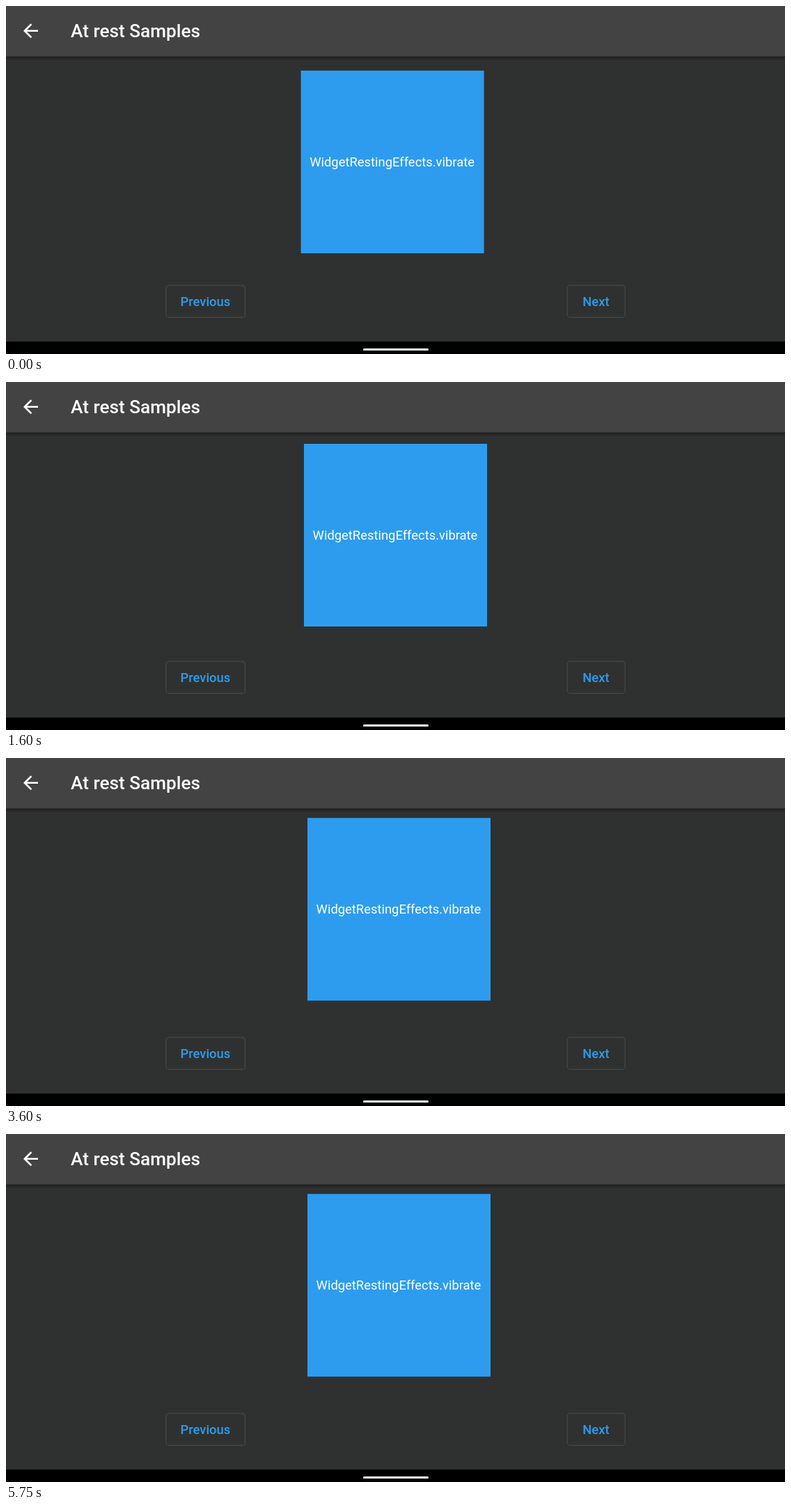
An HTML page for the animation above (5800 ms loop, 1119 by 501 pixels).

```html
<!DOCTYPE html>
<html lang="en">
<head>
<meta charset="utf-8">
<title>At rest Samples</title>
<style>
  html, body { margin: 0; width: 100%; height: 100%; overflow: hidden; background: #2f3130; }
  svg { display: block; width: 100%; height: 100%; }
  text { font: 500 18.4px Roboto, sans-serif; fill: #2d9cee; text-anchor: middle; }
  .title { font-size: 26.2px; fill: #fff; text-anchor: start; }
  .label { font-weight: 400; fill: #fff; }
  .button { fill: none; stroke: #464848; stroke-width: 1.2; }
</style>
</head>
<body>
<svg viewBox="0 0 1119 501">
  <defs>
    <linearGradient id="shade" x2="0" y2="1">
      <stop offset="0" stop-color="#000" stop-opacity=".4"/>
      <stop offset="1" stop-color="#000" stop-opacity="0"/>
    </linearGradient>
  </defs>
  <rect width="1119" height="501" fill="#2f3130"/>

  <g id="box">
    <rect width="263" height="263" fill="#2d9cee"/>
    <text class="label" x="131" y="138">WidgetRestingEffects.vibrate</text>
  </g>

  <rect y="72" width="1119" height="7" fill="url(#shade)"/>
  <rect width="1119" height="72.5" fill="#434343"/>
  <path transform="translate(19.7 20) scale(1.315)" fill="#fff"
    d="M20 11H7.83l5.59-5.59L12 4l-8 8 8 8 1.41-1.41L7.83 13H20z"/>
  <text class="title" x="93" y="45">At rest Samples</text>

  <rect class="button" x="229.8" y="402.2" width="113.5" height="46.2" rx="4.5"/>
  <text x="286.4" y="432">Previous</text>
  <rect class="button" x="806.2" y="402.2" width="83" height="46.2" rx="4.5"/>
  <text x="847.4" y="432">Next</text>

  <rect y="483" width="1119" height="18" fill="#000"/>
  <rect x="513" y="493" width="94" height="3" rx="1.5" fill="#fff"/>
</svg>
<script>
  const LOOP = 5800;
  const lowLeft = [423.6, 93], lowRight = [432, 93];
  const topLeft = [423.6, 84.2], topRight = [433, 86.3];
  const middle = [428, 89];

  // Each stop: arrival time, departure time, position.
  const stops = [
    [0, 350, lowLeft], [560, 620, lowRight], [760, 1230, topRight],
    [1570, 1600, middle], [1780, 1970, lowLeft], [2170, 2300, topLeft],
    [2720, 2980, lowRight], [3110, 3640, topRight],
    [3900, 3930, middle], [4180, 4370, lowLeft], [4570, 4670, topLeft],
    [5050, 5110, lowRight], [5250, LOOP, topRight]
  ];

  const box = document.getElementById('box');
  const ease = p => p * p * (3 - 2 * p);

  function place(t) {
    const i = stops.findLastIndex(s => s[0] <= t);
    const [, leave, from] = stops[i];
    if (t <= leave) return from;
    const [arrive, , to] = stops[i + 1];
    const p = ease((t - leave) / (arrive - leave));
    return from.map((v, k) => v + (to[k] - v) * p);
  }

  const start = performance.now();
  function draw() {
    const t = (performance.now() - start) % LOOP;
    box.setAttribute('transform', `translate(${place(t)})`);
    requestAnimationFrame(draw);
  }
  draw();
</script>
</body>
</html>
```
